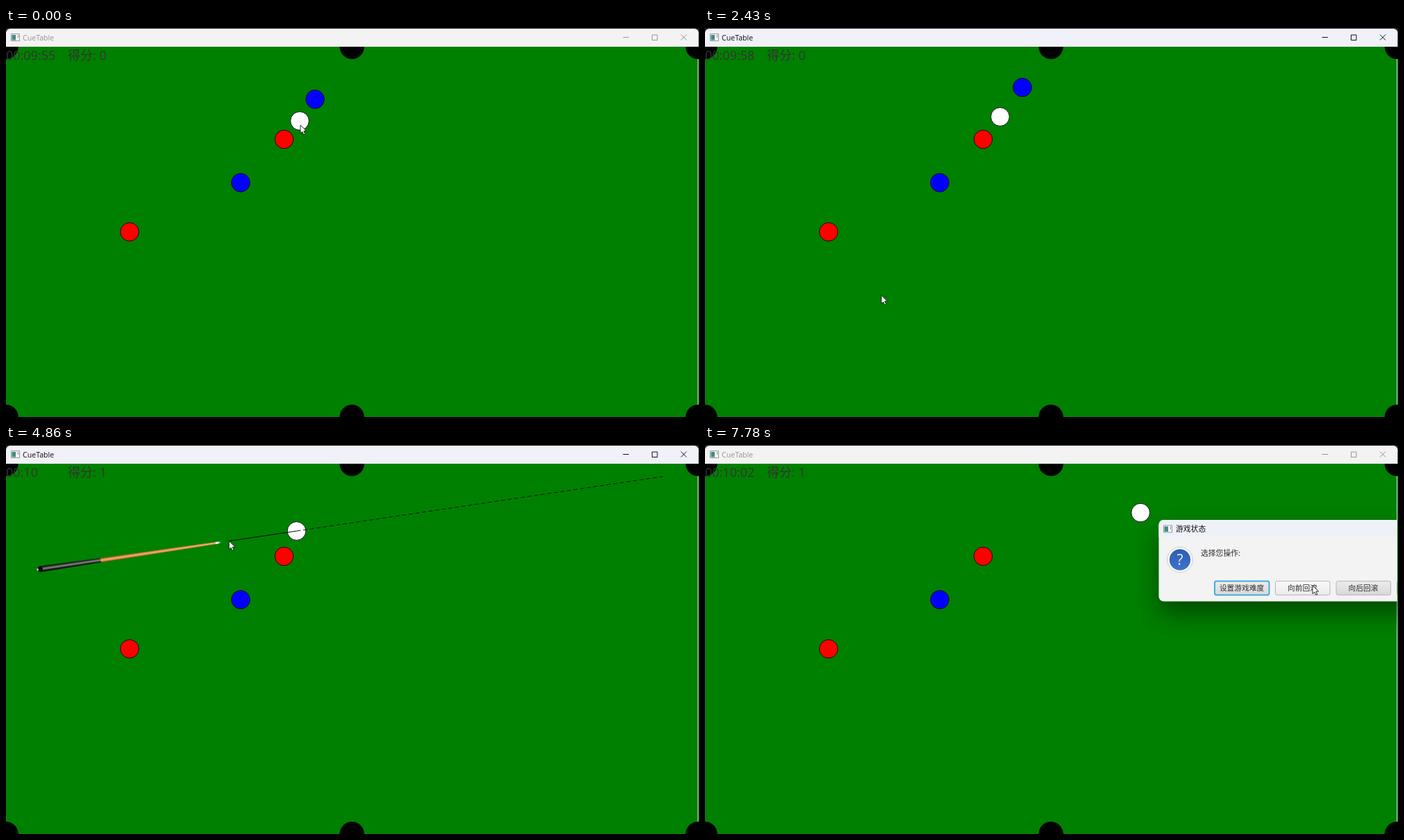
Animation of 998x561 px, one loop 8 s. Source, as an HTML page with a canvas:

```html
<!DOCTYPE html>
<html lang="zh-CN">
<head>
<meta charset="utf-8">
<title>CueTable</title>
<style>
html, body { margin: 0; width: 100%; height: 100%; overflow: hidden; background: #008000; }
canvas { display: block; }
</style>
</head>
<body>
<canvas id="stage" width="998" height="561"></canvas>
<script>
const ctx = document.getElementById('stage').getContext('2d');
const W = 998, H = 561, LOOP = 8000, TOP = 27;
const UNIT = 0.889, R = 15 * UNIT, POCKET = 20 * UNIT, REACH = 600 * UNIT;
const FONT = '"Open Sans", "Noto Sans CJK SC", "Noto Sans CJK", sans-serif';
const DRAG = 8.125e-5;                       // rolling friction, px per ms^2
const PRESS = [420, 4260], SHOT = [2375, 5132], HIT = 2386, POTTED = 2510, DIALOG = 6440;
const POCKETS = [0, 498.2, 996.5].flatMap(x => [[x, TOP], [x, H]]);
const BUTTONS = ['设置游戏难度', '向前回滚', '向后回滚', ''];

// time, x, y: places where the pointer turns or rests
const TURNS = [
  [480, 424, 140], [1050, 298, 343], [1720, 254, 385.5], [2500, 254, 385.5], [3560, 420, 127],
  [4260, 417, 125], [4340, 386, 144], [4430, 283, 187], [4900, 322, 137.5], [5700, 322, 137.5],
  [6490, 581, 170], [7170, 875, 202.5]
];

const clamp = (v, lo = 0, hi = 1) => Math.max(lo, Math.min(hi, v));
const ease = p => p * p * (3 - 2 * p);

function pointerAt(t) {
  const i = clamp(TURNS.findLastIndex(k => k[0] <= t), 0, TURNS.length - 2);
  const [t0, x0, y0] = TURNS[i], [t1, x1, y1] = TURNS[i + 1];
  const p = ease(clamp((t - t0) / (t1 - t0)));
  return [x0 + (x1 - x0) * p, y0 + (y1 - y0) * p];
}

// distance rolled after s ms at starting speed v
function roll(v, s) {
  s = clamp(s, 0, v / DRAG);
  return v * s - DRAG * s * s / 2;
}

function along(x, y, degrees, d) {
  const a = degrees * Math.PI / 180;
  return [x + Math.cos(a) * d, y - Math.sin(a) * d];
}

function whiteAt(t) {
  if (t < HIT) return along(423, 134, 56, 6.2 * clamp((t - SHOT[0]) / (HIT - SHOT[0])));
  if (t < SHOT[1]) return along(426.4, 128.9, 148.4, roll(0.0389, t - HIT));
  return along(418.5, 124.1, 7.24, roll(0.214, Math.min(t, DIALOG) - SHOT[1]));
}

function paint(fill, stroke, width = 1) {
  if (fill) { ctx.fillStyle = fill; ctx.fill(); }
  if (stroke) { ctx.strokeStyle = stroke; ctx.lineWidth = width; ctx.stroke(); }
}

function disc(x, y, r, fill, stroke, width) {
  ctx.beginPath();
  ctx.arc(x, y, r, 0, 2 * Math.PI);
  paint(fill, stroke, width);
}

function ball([x, y], color) { disc(x, y, R, color, '#000', UNIT); }

function line(x0, y0, x1, y1, color) {
  ctx.beginPath();
  ctx.moveTo(x0, y0);
  ctx.lineTo(x1, y1);
  paint(null, color);
}

function rounded(x, y, w, h, r, fill, stroke, width) {
  ctx.beginPath();
  ctx.roundRect(x, y, w, h, r);
  paint(fill, stroke, width);
}

function text(s, x, y, size, color, align = 'left') {
  ctx.font = size + 'px ' + FONT;
  ctx.textAlign = align;
  ctx.fillStyle = color;
  ctx.fillText(s, x, y);
}

// vertical gradient
function ramp(y0, y1, ...colors) {
  const g = ctx.createLinearGradient(0, y0, 0, y1);
  colors.forEach((c, i) => g.addColorStop(i / (colors.length - 1), c));
  return g;
}

function windowIcon(x, y) {
  rounded(x + 0.5, y + 0.5, 12, 10, 0, '#fafafa', '#8c8c8c', 0.9);
  rounded(x + 1.5, y + 2, 5.5, 7.5, 0, ramp(y, y + 10, '#3f7f95', '#4a9378'));
  rounded(x + 10, y + 2, 1, 4, 0, '#888');
}

function titleBar(active) {
  const ink = active ? '#111' : '#959595';
  rounded(0, 0, W, 8, 0, '#202020');
  rounded(0, 1, 997.5, TOP - 1, [6, 6, 0, 0], active ? '#f0f1f9' : '#f3f3f3');
  windowIcon(7, 8);
  text('CueTable', 24, 17.7, 10.6, ink);
  line(888.5, 13.5, 897, 13.5, ink);
  rounded(930.5, 10, 7.5, 7.5, 0, null, ink);
  line(972, 9.5, 980, 17.5, ink);
  line(980, 9.5, 972, 17.5, ink);
}

// tapered rod piece lying on the x axis
function rod(x0, x1, w0, w1, ...colors) {
  ctx.beginPath();
  ctx.moveTo(x0, -w0);
  ctx.lineTo(x1, -w1);
  ctx.lineTo(x1, w1);
  ctx.lineTo(x0, w0);
  paint(ramp(-w1, w1, ...colors));
}

function cue(px, py, angle) {
  ctx.save();
  ctx.translate(px, py);
  ctx.rotate(angle);
  ctx.translate(13, 0);
  rod(0, 7, 1.3, 1.6, '#f2f6f2', '#f2f6f2');
  rod(0, 2, 1.3, 1.3, '#3fa9a0', '#3fa9a0');
  rod(7, 174, 1.6, 3.2, '#8a4f1d', '#d98a48', '#f0b070', '#c87a38', '#804818');
  rod(174, 263, 3.2, 4.4, '#080808', '#1c1c1c', '#858585', '#303030', '#080808');
  disc(262, 0, 3.8, '#080808');
  rod(264.5, 266.5, 1, 1.8, '#e8e8e8', '#e8e8e8');
  ctx.restore();
}

function aim(bx, by, px, py) {
  const d = Math.hypot(bx - px, by - py) || 1;
  const ux = (bx - px) / d, uy = (by - py) / d;
  const toWall = uy < 0 ? (by - TOP) / -uy : Infinity;
  const len = Math.min(REACH, toWall);
  const ex = bx + ux * len, ey = by + uy * len;
  line(px, py, bx, by, '#000');
  ctx.setLineDash([6, 3.6]);
  line(bx, by, ex, ey, '#111');
  ctx.setLineDash([8, 4.4]);
  const open = POCKETS.every(([x, y]) => Math.hypot(x - ex, y - ey) > POCKET);
  if (len === toWall && open) disc(ex, ey, R, null, '#fff', 2 * UNIT);
  ctx.setLineDash([]);
}

function button(label, i, hover) {
  const x = 734 + 87.5 * i;
  const fill = hover ? ['#fafafa', '#ebebeb'] : ['#ececec', '#d8d8d8'];
  rounded(x, 196.3, 78.5, 20, 2.5, ramp(196, 216, ...fill),
    i ? '#b4b4b4' : '#2fa9d8', i ? 1 : 1.8);
  text(label, x + 39, 210.2, 10.7, '#303030', 'center');
}

function dialog(t, px) {
  const p = clamp((t - DIALOG) / 200), s = 1 - 0.1 * (1 - p) ** 3;
  ctx.save();
  ctx.beginPath();
  ctx.rect(0, 0, 997, H);
  ctx.clip();
  ctx.globalAlpha = clamp(p * 4);
  ctx.translate(793, 143);
  ctx.scale(s, s);
  ctx.translate(-793, -143);
  ctx.shadowColor = 'rgba(0,0,0,.42)';
  ctx.shadowBlur = 36;
  ctx.shadowOffsetY = 18;
  rounded(653.5, 108, 420, 117.5, 7, '#f3f3f3');
  ctx.shadowColor = 'transparent';
  rounded(653.5, 108, 420, 25, [7, 7, 0, 0], '#eff1f9');
  windowIcon(660, 115.5);
  text('游戏状态', 678, 125, 10.8, '#111');
  disc(684, 165.5, 18.2, '#fff', '#c4c8cc');
  disc(684, 165.5, 15.2, ramp(150, 181, '#2c5db0', '#3f74cc'));
  text('?', 684, 173, 21, '#e6efff', 'center');
  text('选择您操作:', 714, 159.5, 10.8, '#303030');
  BUTTONS.forEach((label, i) => button(label, i, i === 1 && px > 821));
  ctx.restore();
}

function arrow(x, y) {
  ctx.save();
  ctx.translate(x, y);
  ctx.beginPath();
  [[0, 0], [0, 12], [2.8, 9.5], [4.7, 13.8], [6.8, 12.9], [4.9, 8.7], [8.6, 8.6]]
    .forEach(p => ctx.lineTo(...p));
  ctx.closePath();
  paint('#fff', '#111', 0.9);
  ctx.restore();
}

// minutes and seconds; whole minutes drop the seconds
function clock(t) {
  const n = 596 + Math.floor((Math.min(t, DIALOG) - 180) / 1000);
  const two = v => String(v).padStart(2, '0');
  return '00:' + two(Math.floor(n / 60)) + (n % 60 ? ':' + two(n % 60) : '');
}

function draw(t) {
  const [px, py] = pointerAt(t), [bx, by] = whiteAt(t);
  const aiming = PRESS.some((p, i) => t >= p && t < SHOT[i]);

  rounded(0, 0, W, H, 0, '#008000');
  rounded(996, TOP, 1, H, 0, '#c8d6c8');
  POCKETS.forEach(([x, y]) => disc(x, y, POCKET, '#000'));

  ball([bx, by], '#fff');
  if (aiming) aim(bx, by, px, py);
  ball([400.5, 160.5], '#f00');
  ball([338, 223], '#00f');
  ball([178, 294], '#f00');
  if (t < POTTED) ball(along(445, 102.7, 54.7, roll(0.475, t - HIT)), '#00f');
  if (aiming) cue(px, py, Math.atan2(py - by, px - bx));

  text(clock(t), 0, 45.5, 18, '#333');
  text('得分: ' + (t < POTTED ? 0 : 1), 89, 45.5, 18, '#333');
  titleBar(t >= PRESS[0] && t < DIALOG);
  if (t >= DIALOG) dialog(t, px);
  arrow(px, py);
}

let start;
function tick(now) {
  start ??= now;
  draw((now - start) % LOOP);
  requestAnimationFrame(tick);
}
draw(0);
requestAnimationFrame(tick);
</script>
</body>
</html>
```
